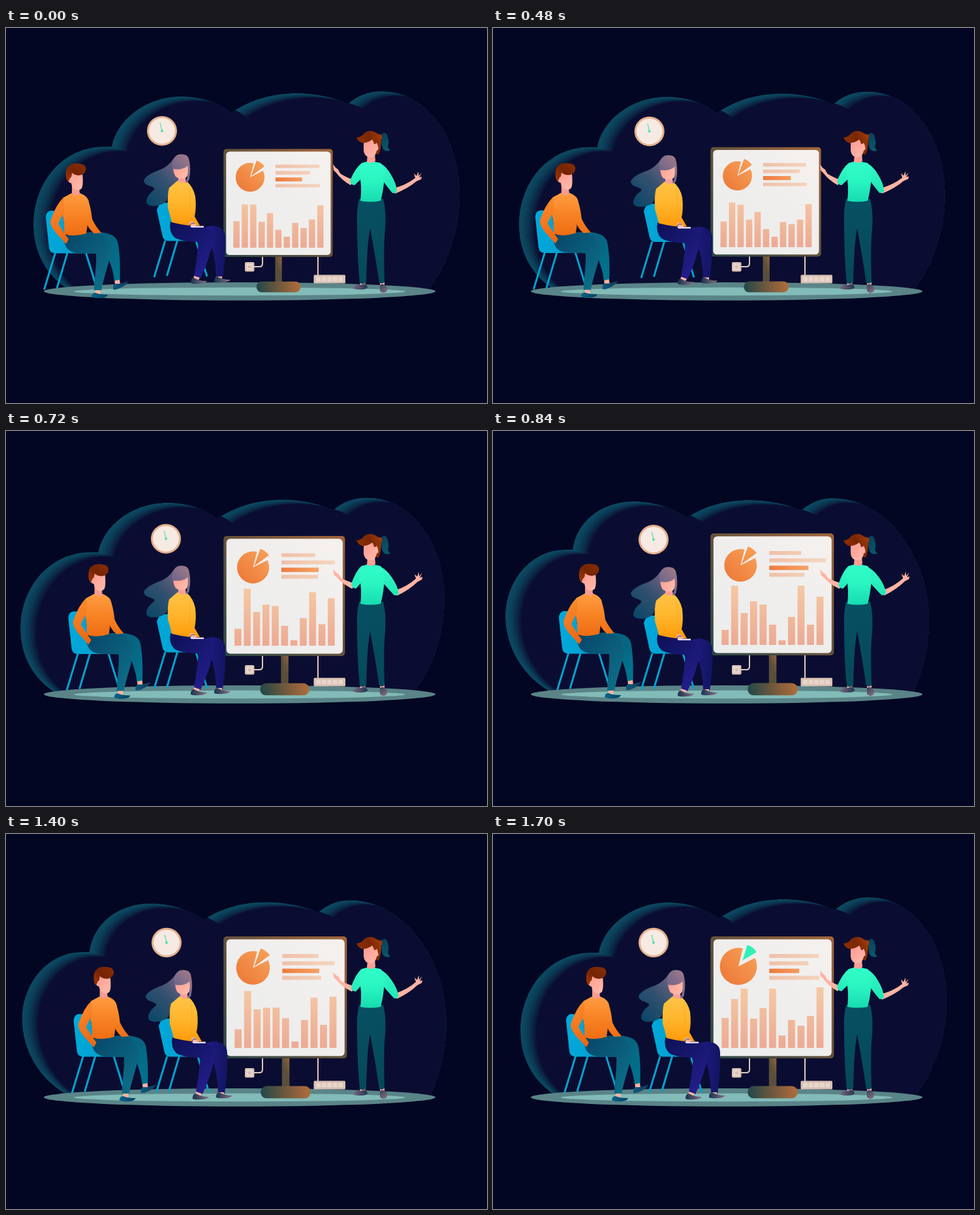
Recreate the animation shown at these times as an HTML page with a canvas. Size 737 by 575 pixels, loop 2520 ms.

```html
<!DOCTYPE html>
<html lang="en">
<head>
<meta charset="utf-8">
<title>Presentation</title>
<style>
html, body { margin: 0; width: 100%; height: 100%; overflow: hidden; background: #020622; }
canvas { display: block; }
</style>
</head>
<body>
<canvas id="stage" width="737" height="575"></canvas>
<script>
const ctx = document.getElementById('stage').getContext('2d');
const LOOP = 2520, STEP = 20, STEPS = 23;
const SKIN = '#ffb3a3';

const ease = u => u < .5 ? 2 * u * u : 1 - 2 * (1 - u) * (1 - u);
const steps = (t, start) =>
  Math.min(STEPS, Math.max(0, Math.floor((t - start) / STEP) + 1)) / STEPS;
const mix = (a, b, k) => a + (b - a) * k;

function grad(x0, y0, x1, y1, ...colors) {
  const g = ctx.createLinearGradient(x0, y0, x1, y1);
  colors.forEach((c, i) => g.addColorStop(i / (colors.length - 1), c));
  return g;
}
function fill(d, color) {
  ctx.fillStyle = color;
  ctx.fill(new Path2D(d));
}
function line(d, color, width) {
  ctx.strokeStyle = color;
  ctx.lineWidth = width;
  ctx.stroke(new Path2D(d));
}
function box(x, y, w, h, r, color) {
  ctx.fillStyle = color;
  ctx.beginPath();
  ctx.roundRect(x, y, w, h, r);
  ctx.fill();
}
function oval(x, y, rx, ry, color) {
  ctx.fillStyle = color;
  ctx.beginPath();
  ctx.ellipse(x, y, rx, ry, 0, 0, 7);
  ctx.fill();
}
function at(x, y, draw) {
  ctx.save();
  ctx.translate(x, y);
  draw();
  ctx.restore();
}
function turned(x, y, angle, draw) {
  ctx.save();
  ctx.translate(x, y);
  ctx.rotate(angle);
  ctx.translate(-x, -y);
  draw();
  ctx.restore();
}

// Two cloud outlines with their left, right and top edges
const WIDE = {
  left: 42, right: 695, top: 97,
  path: new Path2D(`M100,404 C60,380 42,342 42,302 C42,235 88,182 150,182 L162,182
    C170,140 215,105 268,105 C300,105 325,115 345,130 C375,109 410,100 445,100
    C475,100 505,107 523,117 C537,104 555,97 575,97 C645,97 695,170 695,255
    C695,310 677,362 647,402Z`)
};
const NARROW = {
  left: 19, right: 668, top: 103,
  path: new Path2D(`M92,402 C45,378 19,330 19,285 C19,228 60,182 110,182 L122,182
    C127,140 165,108 215,108 C247,108 275,118 297,133 C325,114 358,106 392,106
    C422,106 450,112 472,122 C485,110 502,103 520,103 C600,103 668,190 668,290
    C668,330 660,365 643,402Z`)
};
const FLOOR = 404;

// The outline is stretched to the moving bounds and swapped on arrival
function cloud(p1, p2) {
  const shape = p1 === 1 && p2 < 1 ? NARROW : WIDE;
  const edge = name => mix(WIDE[name], NARROW[name], p1 - p2);
  const sx = (edge('right') - edge('left')) / (shape.right - shape.left);
  const sy = (FLOOR - edge('top')) / (FLOOR - shape.top);
  ctx.save();
  ctx.translate(edge('left'), FLOOR);
  ctx.scale(sx, sy);
  ctx.translate(-shape.left, -FLOOR);
  ctx.clip(shape.path);
  const layers = 9;
  for (let i = 0; i <= layers; i++) {
    const k = i / layers, c = k ** 1.6;
    ctx.fillStyle = `rgb(${mix(12, 10, c)},${mix(72, 13, c)},${mix(96, 49, c)})`;
    at(24 * k, 7 * k, () => ctx.fill(shape.path));
  }
  ctx.restore();
}

function ground() {
  oval(358, 403.8, 300, 13.9, '#5a8488');
  oval(358, 404, 254, 6.2, '#82bbb8');
}

function clock() {
  oval(0, 0, 23, 22.7, '#e6b08c');
  oval(0, 0, 20, 19.7, '#f6eae3');
  line('M0,0 L-2.8,-12', '#56dcae', 1.2);
  oval(0, 0, 2, 2, '#4fe0b0');
}

function cables() {
  line('M393,338 V361 Q393,366 388,366 H379', '#dec8bc', 2);
  line('M478,338 V382', '#dec8bc', 2);
  box(366, 359, 14.5, 14.5, 2, '#d9c3b8');
  box(368.5, 361.5, 9.5, 9.5, 1, '#ead8cd');
  box(371, 364, 4.5, 4.5, 1, '#d3bcb0');
  box(471.5, 378.5, 48.5, 13, 1.5, '#d8c2b6');
  for (let i = 0; i < 5; i++) box(475 + i * 8.6, 381.5, 7, 7, 1, '#e9d6ca');
}

// Chart data: first, second and third state
const BARS = [
  [46, 75, 75, 45, 60, 31, 19, 43, 34, 49, 73.5],
  [23, 91, 49, 67, 62, 31, 7, 43, 91, 31, 74],
  [46, 75, 91, 45, 61, 91, 19, 43, 34, 49, 93]];
const LINES = [[76, 49], [60, 87], [46, 60], [77, 54]];

function wedge(x, y, r, from, to, color) {
  ctx.fillStyle = color;
  ctx.beginPath();
  ctx.moveTo(x, y);
  ctx.arc(x, y, r, from * Math.PI / 180, to * Math.PI / 180);
  ctx.fill();
}

function board(p1, p2) {
  box(422.5, 340, 11.5, 50, 0, grad(422, 350, 434, 345, '#594f3b', '#8d613c'));
  box(390, 386.5, 76.5, 18.8, 9, grad(390, 400, 466, 390, '#1f4848', '#70583d', '#b16d3b'));
  box(333, 157, 189, 187, 5, grad(333, 344, 522, 157, '#2a4845', '#65523c', '#a3663a'));
  box(337.5, 161.5, 181, 179, 6, grad(338, 340, 519, 162, '#ebedec', '#efeeed', '#f5f1ee'));

  const ink = grad(0, 237, 0, 328, '#f5c9a5', '#ecaa93');
  BARS[0].forEach((h, i) => {
    const v = h + (BARS[1][i] - h) * p1 + (BARS[2][i] - BARS[1][i]) * p2;
    box(350 + i * 14.53, 328 - v, 10.8, v, 0, ink);
  });

  LINES.forEach(([long, short], i) => {
    const w = mix(long, short, p1 - p2);
    const colors = i === 2 ? ['#ee7a3d', '#f5a469'] : ['#efc0a9', '#f5d5bf'];
    box(423, 184 + i * 11.2, w, i === 2 ? 6.8 : 6, 0, grad(423, 0, i === 2 ? 483 : 505, 0, ...colors));
  });

  const px = mix(379, 375.7, p2), py = mix(206, 203, p2), r = mix(25, 28.4, p2);
  wedge(px, py, r, -27, 284, grad(px - r, py + r, px + r, py - r, '#ec7533', '#f7a35c'));
  if (p2 < 1) {
    wedge(mix(380.5, 377.5, p2), mix(204, 201.5, p2), mix(28.8, 33, p2), -70, -36,
      grad(381, 204, 400, 178, '#f08b42', '#f7a059'));
  } else {
    wedge(382, 194, 25.2, -73, -31, '#30f0b7');
  }
}

function chair(back, x, y) {
  fill(back, grad(x - 12, 0, x + 60, 0, '#00a9db', '#0a97c4'));
  line(`M${x},${y} l-17,56 M${x + 18.5},${y} l-16,54 M${x + 47},${y} l17,55`, '#04a2d1', 3);
}

function man() {
  chair('M61,291 Q61,281 69,280 L86,281 L92,322 L132,332 L136,345.5 H75 Q67,345 66,337Z', 75.5, 345);
  fill('M118,314 C152,311 170,315 172,332 C175,352 175,368 174.5,387 L166,388 C164,370 158,352 148,338Z',
    grad(125, 320, 175, 375, '#0b5c7b', '#00738e'));
  fill('M90,318 L126,314 C150,314 163,326 160,345 C157,366 150,380 146,403 L135,402 C136,380 139,362 138,346 L108,345 C94,343 87,333 90,318Z',
    grad(90, 325, 160, 375, '#07486c', '#0d6b85'));
  fill('M137,402 H145.5 L144,409 H136Z M166.5,387.5 L174,386 L175,393 L167,394Z', SKIN);
  fill('M131,412 Q132,405 137,406 Q143,409 156,409 Q155,413 146,414 Q136,415 131,412Z',
    grad(131, 0, 156, 0, '#0b658b', '#063f60'));
  fill('M164,401 Q163,393 168,392 Q176,393 187,388 Q186,393 178,397 Q170,402 164,401Z',
    grad(164, 0, 187, 0, '#0b5b80', '#12395b'));

  const shirt = grad(0, 253, 0, 320, '#ff9d43', '#f88324', '#ee6b12');
  fill('M124,261 Q129,268 132,293 Q137,304 146,314 L135,315 Q124,307 121,290Z', shirt);
  fill('M101,253 Q107,257 113,253 Q126,258 127,267 Q127,291 123,315 Q105,321 89,316 Q90,298 86,285 Q84,265 88,260Z', shirt);
  fill('M89,259 Q76,271 68,296 Q68,306 82,320 L92,331 L96,324 Q87,312 80,300 L89,281Z',
    grad(68, 265, 95, 328, '#fb8b2e', '#ec6510'));

  fill('M101,240 L112,243 L113,254 Q107,260 101,253Z', '#f59b90');
  fill('M97,222 H117 Q119,240 116,246 Q112,250 106,248 Q101,245 100,238 Q95,237 95,232Z',
    grad(97, 225, 118, 248, '#ff9f94', '#ffbcab'));
  fill('M92,229 Q90,211 103,208 Q122,206 122.5,216 Q122,225 112,226 Q105,226 101,222 Q101,229 98,230 Q96,236 95,236 Q93,234 92,229Z',
    grad(92, 236, 122, 208, '#a23605', '#752403', '#8a2e02'));
}

function woman() {
  chair('M231,279 L236,268 L252,268 L258,318 L293,322 L297,326.5 H248 Q242,326 240,320Z', 244, 326);
  fill('M257,200 Q249,212 237,217 Q214,225 211,234 Q212,240 220,242 Q229,245 227,248 Q214,258 215,268 Q219,275 233,272 Q249,269 248,255 L268,232 L276,206Z',
    grad(214, 265, 272, 206, '#0b4768', '#33506f', '#7c6683'));
  fill('M296,307 L316,303 Q336,305 336,320 Q337,352 332,383 L322,382 Q321,351 313,331Z',
    grad(305, 0, 336, 0, '#201b82', '#121563'));
  fill('M252,297 L288,302 Q318,306 318,322 Q313,352 298,384 L288,381 Q293,352 295,328 Q270,328 258,321 Q249,312 252,297Z',
    grad(252, 300, 312, 365, '#0d1157', '#221d88'));
  fill('M288,380 L297,383 L294,388 L287,385Z M322,381 H331 L331,387 L323,386Z', SKIN);
  const shoe = 'M0,8 Q0,0 5,0 Q13,5 25,5 Q22,9 13,9 Q4,10 0,8Z';
  [[283, 383], [319, 381]].forEach(([x, y]) =>
    at(x, y, () => fill(shoe, grad(0, 0, 25, 0, '#173451', '#8d7081'))));

  const top = grad(0, 235, 0, 303, '#ffc345', '#ffb52c', '#ff9a0a');
  fill('M263,234 Q270,239 277,235 Q287,244 290,258 Q292,276 289,289 L297,303 L288,303 Q278,303 268,301 L254,298 Q252,289 248,276 Q247,254 250,245Z', top);
  line('M281,246 Q284,269 279,290', '#f9a51d', .8);
  fill('M264,225 H274 L276,236 Q270,240 264,235Z', '#f9a096');
  fill('M256,210 H280 Q281,226 275,230 Q267,233 260,228 Q256,222 256,210Z',
    grad(256, 214, 280, 230, '#ff9f94', '#ffc0ad'));
  fill('M255,213 Q254,198 264,194 Q277,192 280,200 Q284,216 281,230 Q281,236 275,237 Q280,226 278.5,211 Q270,219 255,216Z',
    grad(257, 220, 282, 196, '#6b648a', '#a37a88'));
  fill('M281,300 Q282,296 287,297 L293,303 L284,305Z', SKIN);
  line('M282,304 Q283,297 289,300', '#223b68', 1);
  fill('M282,303.5 H303 V306 H284Z', '#e6d9ec');
}

function presenter(p) {
  const swing = -5 * Math.PI / 180 * p;
  const sleeve = grad(0, 205, 0, 255, '#32fac7', '#20e6b5');

  fill('M542,388 H551 L550,396 H543Z M573,388 H580 V397 H573Z', SKIN);
  fill('M531,399 Q538,392 544,394 Q551,390 554,397 Q554,401 543,401 Q535,401 531,399Z',
    grad(531, 0, 554, 0, '#7c6682', '#233650'));
  fill('M573,394 Q578,391 582,395 Q586,400 583,404 Q577,409 573,403Z',
    grad(573, 394, 582, 407, '#39445f', '#8b7080'));
  fill('M541,262 H578 Q583,283 581,308 Q578,332 580,390 Q576,393 572,391 Q566,350 558,307 Q553,332 552,390 Q547,394 542,391 Q538,350 538,300 Q537,278 541,262Z',
    grad(538, 265, 582, 390, '#075063', '#05495a'));

  turned(541, 210, swing, () => {
    fill('M533,233 L528,241 Q514,233 506,222 L502,218 L501,209 L505,214 L509,217 L512,223 Q521,229 533,233Z', SKIN);
    fill('M545,207 Q535,215 527,234 Q528,241 534,241 Q543,233 551,223Z', sleeve);
  });
  turned(579, 212, swing, () => {
    fill('M593,246 L596,254 Q616,246 629,235 L636,232 L637,228 L633,229 L637,222 L632,227 L632,220 L629,227 L625,223 L627,230 Q613,241 593,246Z', SKIN);
    fill('M572,207 Q582,211 590,225 Q598,238 599,250 Q597,254 592,253 Q585,245 573,228Z', sleeve);
  });
  fill('M545,207 Q557,202 574,207 Q582,215 579,238 Q577,255 574,265 Q558,268 543,265 Q546,242 541,222Z',
    grad(0, 205, 0, 266, '#32fdc9', '#28f5c0', '#17dcb1'));

  fill('M574,165 Q580,157 584,164 Q588,177 585,181 Q586,186 589,188 Q578,191 576,181Z',
    grad(574, 165, 588, 187, '#0d4058', '#075a6d'));
  fill('M554,193 L565,190 L566,204 Q560,209 553,205Z', '#f7a096');
  fill('M565,168 L575,172 Q575,183 571,194 L565,193Z', '#822a06');
  fill('M548,174 Q556,168 568,172 L570,179 Q574,178 573,185 Q569,187 568,188 Q566,198 559,198 Q549,198 548,188Z',
    grad(548, 175, 570, 198, '#ff9b91', '#ffbdae'));
  fill('M537,168 Q545,167 549,161 Q557,155 566,160 Q570,164 575,163 Q578,168 574,172 Q575,187 570,194 Q572,183 568,176 Q567,178 564,178 Q563,173 561,171 Q554,177 545,176 Q539,173 537,168Z',
    grad(539, 175, 575, 160, '#8e3003', '#792703', '#a73c0a'));
}

function draw() {
  const t = performance.now() % LOOP;
  const p1 = ease(steps(t, 400)), p2 = ease(steps(t, 1260));

  ctx.fillStyle = '#020622';
  ctx.fillRect(0, 0, 737, 575);
  cloud(p1, p2);
  ground();
  at(mix(239, 246, p1), mix(157.7, 166.5, p1), clock);
  cables();

  const scale = mix(.885, 1, p1);
  ctx.save();
  ctx.translate(333.3, 405.3);
  ctx.scale(scale, scale);
  ctx.translate(-333, -405.3);
  board(p1, p2);
  ctx.restore();

  at(12 * p2, 15 * p1, woman);
  at(40 * p1 + 11 * p2, -4 * p1, man);
  presenter(p1 - p2);
  requestAnimationFrame(draw);
}
draw();
</script>
</body>
</html>
```
